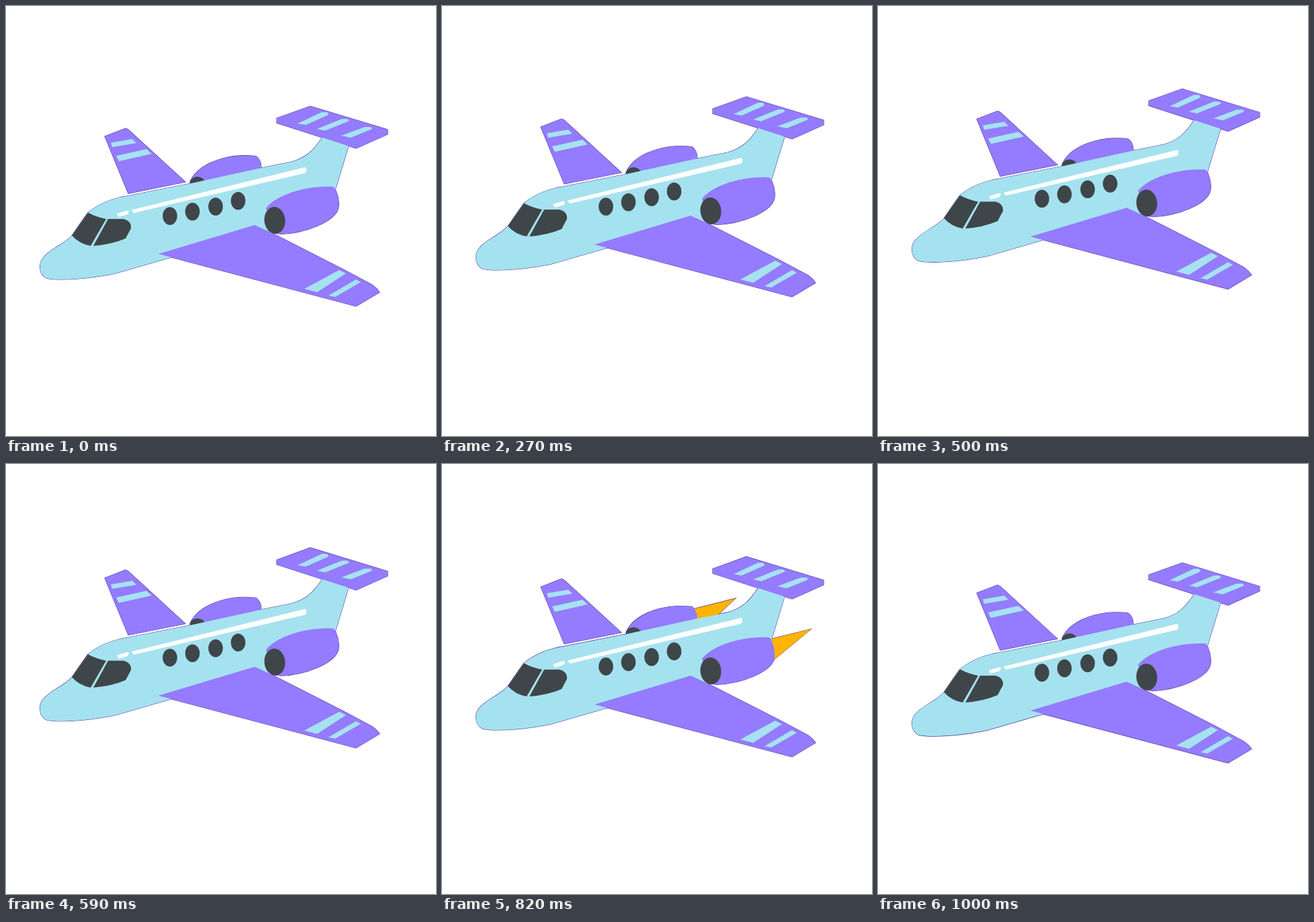
An HTML page with a canvas for the animation above (1.05 s loop, 640 px wide and 640 px high).

```html
<!DOCTYPE html>
<html lang="en">
<head>
<meta charset="utf-8">
<title>Plane</title>
<style>
html, body { margin: 0; height: 100%; overflow: hidden; background: #fff; }
canvas { display: block; width: 640px; height: 640px; }
</style>
</head>
<body>
<canvas id="stage" width="640" height="640"></canvas>
<script>
const ctx = document.getElementById('stage').getContext('2d');
const PURPLE = '#957bff', BLUE = '#a5e2ef', DARK = '#3f4649', GOLD = '#ffb400', EDGE = '#49329f';
const LOOP = 1050, STEPS = 23;

const shape = d => new Path2D(d);

const backWing = shape('M147 194L178 182L182 184L267 262L182 279Z');
const backEngine = shape('M274 261C281 246 297 234 322 227C340 222 358 222 372 223.500C377 227 380 233 380 241L330 264L274 266Z');
const body = shape('M471 195C458 215 447 226 425 232Q405 236 380 241L273 264.500L182 282.500C153 287 135 297 122 307.500C114 318 106 330 98 342C85 356 66 361 55 375C48 384 49 399 60 405C80 410 130 405 163 398L246 374L371 345L396 337L470 300L490 274L510 208Z');
const tail = shape('M403 167L453 149L568 184V191L521 212L403 174Z');
const engine = shape('M387 301C400 283 443 267 486 269Q490 270 491 275C496 286 496 298 494 303C487 321 447 338 409 339.500L400 338Z');
const wing = shape('M227 369L370 326L392 336L500 391L545 415L552 421L556 426L521 447L246 374Z');
const flames = [
  shape('M374 227L437 211L411 235L376 246Z'),
  shape('M486 272.500L549 257L493 303Z')
];
const tailBars = shape('M434 175L470 158L478 158L480 162L446 177Z' +
  'M463 183L500 168L508 168L511 171L475 185.500Z' +
  'M499 193L534 180L543 180L545 183L513 196Z');
const backBars = shape('M156 203.500L188 198L194 204L158 210Z' +
  'M164 223L209 213L217 220L168 231Z');
const wingBars = shape('M444 421L496 393L506 398L463 426Z' +
  'M480 431L521 407L528 411L490 433Z');
const trim = shape('M187 303.500L443 240.500Q447 239 447 243V246Q447 248 444 249L190 308Z' +
  'M165 309L180 304.500Q183 304 183 306L181 310L168 314Z');
const cockpit = shape('M122 307.500Q134 314 149 317L126 357Q109 354 98 341.500Z' +
  'M152 317L175 317Q187 320 186 331L178 346Q157 355 130 357Z');

function fill(path, color) {
  ctx.fillStyle = color;
  ctx.fill(path);
}

function oval(x, y, rx, ry, turn = 0) {
  ctx.fillStyle = DARK;
  ctx.beginPath();
  ctx.ellipse(x, y, rx, ry, turn, 0, Math.PI * 2);
  ctx.fill();
}

// Uneven steps of 40 and 50 ms
const start = i => 45 * i + (i % 2 ? 5 : i >= 12 ? 10 : 0);

function stepAt(t) {
  let i = STEPS - 1;
  while (i > 0 && start(i) > t) i--;
  return i;
}

const lift = [[0, 0], [11, -25.7], [12, -26.6], [13, -24.3], [18, -11.1], [22, -1.9], [23, 0]];

function liftAt(i) {
  const k = lift.findIndex(p => p[0] > i);
  const [x0, y0] = lift[k - 1], [x1, y1] = lift[k];
  return y0 + (y1 - y0) * (i - x0) / (x1 - x0);
}

function draw(step) {
  const burning = step >= 16 && step <= 20;
  ctx.setTransform(1, 0, 0, 1, 0, 0);
  ctx.fillStyle = '#fff';
  ctx.fillRect(0, 0, 640, 640);
  ctx.translate(0, liftAt(step));

  // Thin dark rim around the silhouette
  ctx.strokeStyle = EDGE;
  ctx.lineWidth = 1.1;
  const parts = [backWing, backEngine, body, tail, engine, wing];
  if (burning) parts.push(...flames);
  parts.forEach(p => ctx.stroke(p));

  if (burning) flames.forEach(p => fill(p, GOLD));
  fill(backWing, PURPLE);
  fill(backBars, BLUE);
  fill(backEngine, PURPLE);
  oval(285, 263, 11, 9);
  fill(body, BLUE);
  if (burning) fill(flames[1], GOLD);
  fill(tail, PURPLE);
  fill(tailBars, BLUE);
  fill(trim, '#fff');
  fill(cockpit, DARK);
  for (const [x, y] of [[244, 312.5], [277.5, 306], [312, 298.5], [345.5, 290]]) {
    oval(x, y, 10.8, 13.3);
  }
  fill(engine, PURPLE);
  oval(400, 319, 15.5, 20, -0.1);
  fill(wing, PURPLE);
  fill(wingBars, BLUE);
}

function tick() {
  draw(stepAt(performance.now() % LOOP));
  requestAnimationFrame(tick);
}
tick();
</script>
</body>
</html>
```
